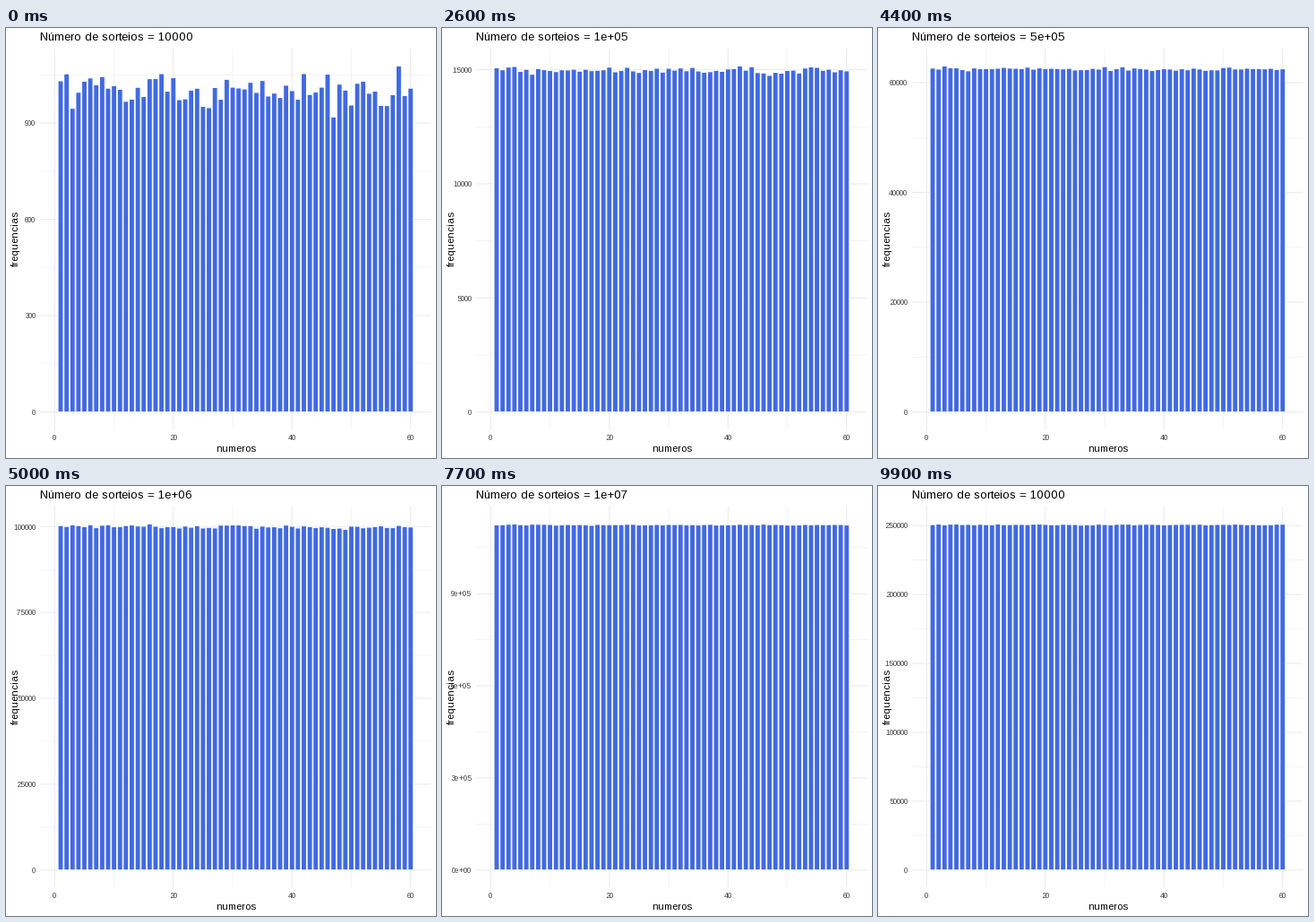
Write a matplotlib script that moves like this. It is 480 px wide and 480 px high and loops after 10000 ms.

```python
import math

import matplotlib.pyplot as plt
import numpy as np
from matplotlib.animation import FuncAnimation
from matplotlib.collections import LineCollection, PolyCollection

plt.rcParams.update({
    "font.family": "Liberation Sans",
    "text.hinting": "force_autohint",
    "text.hinting_factor": 1,  # whole-pixel letter advances
})

SIZE, DPI, FRAMES = 480, 80, 100
PT = 72 / DPI  # points per pixel
LEFT, RIGHT, TOP, BOTTOM = 38.2, 474.5, 23.0, 448.0
EXPAND = 0.05
PAD = (BOTTOM - TOP) * EXPAND / (1 + 2 * EXPAND)
BASE, PEAK = BOTTOM - PAD, TOP + PAD
GRID, BLUE, GREY = "#ebebeb", "#4169e1", "#4d4d4d"

BALLS, PICKS = 60, 6
STEPS = 8  # frames per tween
# Draws, most frequent ball, least frequent ball
ROUNDS = [
    (10_000, 58, 47), (100_000, 42, 47), (500_000, 3, 31),
    (1_000_000, 16, 49), (10_000_000, 4, 17), (20_000_000, 12, 26),
]
LEAVE = [math.ceil(8 + 16.8 * k) for k in range(len(ROUNDS))]
rng = np.random.default_rng(6)


def lottery(draws, most, least):
    """Simulated frequency of each ball."""
    p = PICKS / BALLS
    z = rng.normal(size=BALLS).clip(-1.8, 1.8)
    z[most - 1], z[least - 1] = 2.6, -2.7
    return draws * p + z * math.sqrt(draws * p * (1 - p))


def nice_breaks(lo, hi, m=5):
    """Extended Wilkinson labelling of the range lo..hi."""
    span = hi - lo
    best, found = -9, []
    for i, q in enumerate((1, 5, 2, 2.5, 4, 3)):
        for k in range(2, 11):
            z0 = math.ceil(math.log10(span / (k + 1) / q))
            for z in (z0, z0 + 1):
                step = q * 10.0 ** z
                for s in range(math.floor(hi / step) - k + 1, math.ceil(lo / step) + 1):
                    a, b = s * step, (s + k - 1) * step
                    simple = (a <= 0 <= b) - i / 5
                    cover = 1 - 0.5 * ((hi - b) ** 2 + (lo - a) ** 2) / (0.1 * span) ** 2
                    r = (k - 1) / (b - a)
                    rt = (m - 1) / (max(b, hi) - min(a, lo))
                    dense = 2 - max(r / rt, rt / r)
                    score = 0.25 * simple + 0.2 * cover + 0.5 * dense
                    if score > best:
                        best, found = score, [a + step * n for n in range(k)]
    return found


def labels(values):
    """Fixed or scientific notation, whichever is shorter."""
    ints = [int(round(v)) for v in values]
    digits = max(len(str(abs(v)).rstrip("0")) for v in ints)
    sci = [f"{v:.{max(digits - 1, 0)}e}" for v in ints]
    fixed = [str(v) for v in ints]
    return fixed if max(map(len, fixed)) <= max(map(len, sci)) else sci


def x_px(v):
    lo, hi = 0.55, BALLS + 0.45
    pad = EXPAND * (hi - lo)
    return LEFT + (v - lo + pad) / (hi - lo + 2 * pad) * (RIGHT - LEFT)


STATES = [lottery(*r) for r in ROUNDS]
TITLES = [labels([r[0]])[0] for r in ROUNDS]

fig = plt.figure(figsize=(SIZE / DPI, SIZE / DPI), dpi=DPI, facecolor="white")
ax = fig.add_axes([0, 0, 1, 1])
ax.set(xlim=(0, SIZE), ylim=(SIZE, 0))
ax.axis("off")


def add(collection):
    collection.set_snap(False)
    return ax.add_collection(collection, autolim=False)


def grid(width, z):
    return add(LineCollection([], colors=GRID, linewidths=width * PT, zorder=z))


def text(x, y, s, size, color="black", **kw):
    return ax.text(x, y, s, fontsize=size * PT, color=color, va="baseline",
                   zorder=5, **kw)


minor, major = grid(0.53, 1), grid(1.07, 2)
bars = add(PolyCollection([], facecolors=BLUE, edgecolors="white",
                          linewidths=1.07 * PT, joinstyle="miter", zorder=3))

ticks = [text(33.2, 0, "", 8.8, GREY, ha="right") for _ in range(10)]
for v in (0, 20, 40, 60):
    text(x_px(v), 460, str(v), 8.8, GREY, ha="center")
text((LEFT + RIGHT) / 2, 473, "numeros", 11, ha="center")
text(14, 234.5, "frequencias", 11, ha="center", rotation=90, rotation_mode="anchor")
title = text(LEFT, 14, "", 13.2)


def pose(i):
    """Counts and title at frame i."""
    k = sum(i >= t for t in LEAVE) - 1
    if k < 0:
        return STATES[0], TITLES[0]
    p = min((i - LEAVE[k]) / STEPS, 1)
    nxt = (k + 1) % len(STATES)
    counts = STATES[k] + p * (STATES[nxt] - STATES[k])
    return counts, TITLES[nxt if p >= 0.5 else k]


def draw(i):
    counts, name = pose(i)
    peak = counts.max()
    lo, hi = -EXPAND * peak, (1 + EXPAND) * peak

    def y_px(v):
        return BASE - v / peak * (BASE - PEAK)

    def lines(xs, ys):
        return ([[(x_px(x), TOP), (x_px(x), BOTTOM)] for x in xs]
                + [[(LEFT, y_px(y)), (RIGHT, y_px(y))] for y in ys if lo <= y <= hi])

    marks = nice_breaks(lo, hi)
    half = (marks[1] - marks[0]) / 2
    minor.set_segments(lines((10, 30, 50), [marks[0] - half] + [v + half for v in marks]))
    major.set_segments(lines((0, 20, 40, 60), marks))

    bars.set_verts([
        [(x_px(n - 0.45), BASE), (x_px(n + 0.45), BASE),
         (x_px(n + 0.45), y_px(c)), (x_px(n - 0.45), y_px(c))]
        for n, c in enumerate(counts, 1)
    ])

    shown = [v for v in marks if lo <= v <= hi]
    for t in ticks:
        t.set_text("")
    for t, v, s in zip(ticks, shown, labels(shown)):
        t.set_text(s)
        t.set_y(y_px(v) + 3.2)
    title.set_text(f"Número de sorteios = {name}")
    return [minor, major, bars, title, *ticks]


anim = FuncAnimation(fig, draw, frames=FRAMES, interval=100, repeat=True,
                     repeat_delay=0, blit=False)
plt.show()
```
